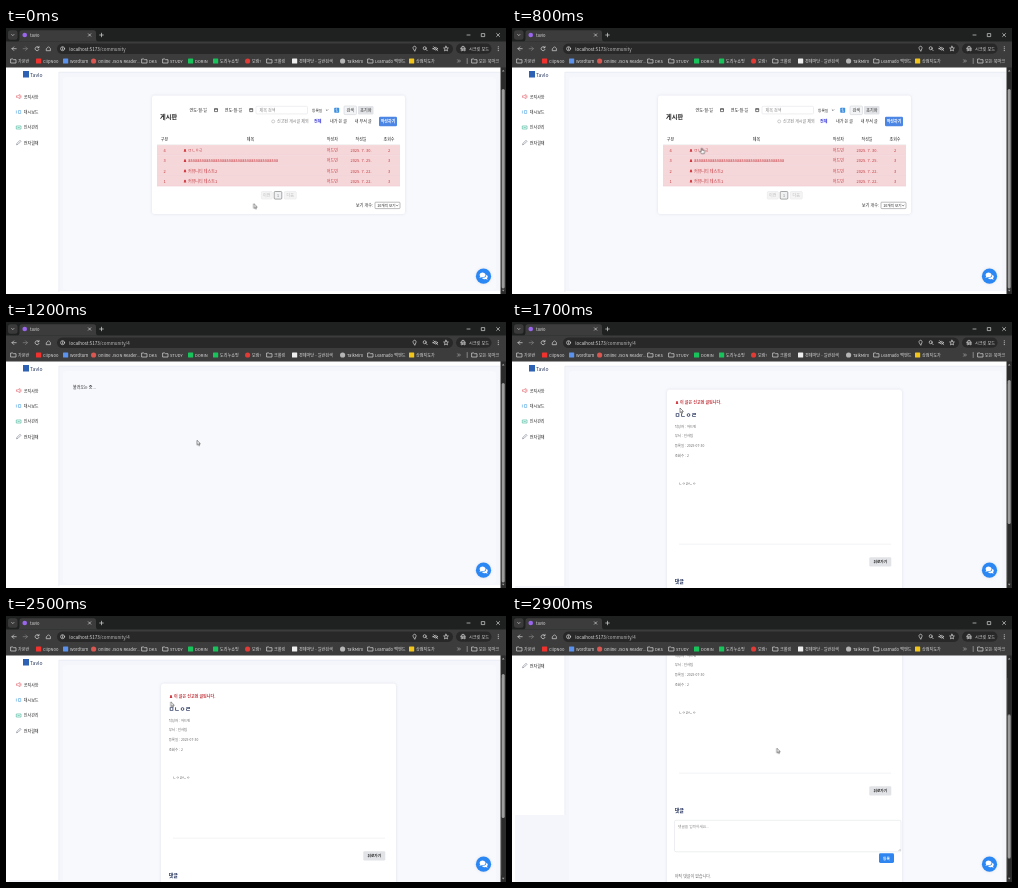
An HTML page for the animation above (3 s loop, 500 by 266 pixels).

```html
<!DOCTYPE html>
<html lang="ko">
<head>
<meta charset="utf-8">
<title>Community board</title>
<style>
html, body { margin: 0; width: 100%; height: 100%; overflow: hidden; background: #fff; }
svg { display: block; width: 500px; height: 266px; }
text { font: 4px "Noto Sans CJK KR", "Noto Sans CJK", "Noto Sans", sans-serif; dominant-baseline: central; fill: #222; white-space: pre; }
.b { font-weight: 700; }
.mid { text-anchor: middle; }
.browser text { fill: #dedede; font-size: 4.1px; }
.line { fill: none; stroke: #d6d6d6; stroke-width: .7; stroke-linecap: round; stroke-linejoin: round; }
.meta text { font-size: 3.4px; fill: #666; }
.row text { fill: #c63d42; }
.shade { filter: drop-shadow(0 0 1.5px rgba(60, 70, 110, .14)); }

.list, .load, .post, .page, .thumb, .cursor, .arrow, .hand { animation: 3s step-end infinite; }
.list { animation-name: list; }
.load { animation-name: load; }
.post { animation-name: post; }
.page { --shift: -65; animation-name: scroll; }
.thumb { --shift: 40.5; animation-name: scroll; }
.cursor { animation-name: move; }
.arrow { animation-name: arrow; }
.hand { animation-name: hand; }

@keyframes list { 0% { opacity: 1 } 39.99%, 100% { opacity: 0 } }
@keyframes load { 0% { opacity: 0 } 39.99% { opacity: 1 } 43.33%, 100% { opacity: 0 } }
@keyframes post { 0% { opacity: 0 } 43.33%, 100% { opacity: 1 } }
@keyframes arrow { 0% { opacity: 1 } 6.66% { opacity: 0 } 39.99%, 100% { opacity: 1 } }
@keyframes hand { 0% { opacity: 0 } 6.66% { opacity: 1 } 39.99%, 100% { opacity: 0 } }
@keyframes scroll {
  0% { transform: matrix(1, 0, 0, 1, 0, 0) }
  86.66% { transform: matrix(1, 0, 0, 1, 0, 0); animation-timing-function: steps(3) }
  96.66%, 100% { transform: matrix(1, 0, 0, 1, 0, var(--shift)) }
}
@keyframes move {
  0% { transform: matrix(1, 0, 0, 1, 247.7, 175.6); animation-timing-function: steps(5) }
  16.66% { transform: matrix(1, 0, 0, 1, 187, 121.3); animation-timing-function: steps(6) }
  36.66% { transform: matrix(1, 0, 0, 1, 192.3, 118.3) }
  39.99% { transform: matrix(1, 0, 0, 1, 191, 118.3); animation-timing-function: steps(5) }
  56.66% { transform: matrix(1, 0, 0, 1, 168, 86); animation-timing-function: steps(8) }
  83.33% { transform: matrix(1, 0, 0, 1, 164.8, 85.8); animation-timing-function: steps(4) }
  96.66%, 100% { transform: matrix(1, 0, 0, 1, 264.8, 132.2) }
}
</style>
</head>
<body>
<svg viewBox="0 0 500 266">
  <defs>
    <path id="folder" class="line" d="M0 -2H1.8L2.5 -1.3H5V2H0Z"/>
    <path id="down" d="M-1.1 -.5L0 .6L1.1 -.5" fill="none" stroke="#333" stroke-width=".6"/>
    <g id="date">
      <text>연도-월-일</text>
      <path d="M25 -1.4H28V1.6H25ZM25 -.7H28" fill="none" stroke="#222" stroke-width=".6"/>
    </g>
    <path id="siren" d="M-1.2 1.6V.9H-.9V-.4A.9 .9 0 0 1 .9 -.4V.9H1.2V1.6Z" fill="#d0343b"/>
  </defs>

  <rect width="500" height="266" fill="#fff"/>

  <g class="page">
    <rect x="53" y="44" width="441" height="219" fill="#f4f6fb"/>
    <rect x="57" y="49" width="433" height="213" rx="3" fill="#f8f9fd"/>
    <g class="post">
      <rect x="3" y="44" width="491" height="310" fill="#f4f6fb"/>
      <rect x="57" y="49" width="433" height="310" rx="3" fill="#f8f9fd"/>
      <rect x="155" y="67.5" width="235" height="290" rx="3" fill="#fff" class="shade"/>
    </g>
    <path d="M0 30H53V264H0Z" fill="#fff"/>
    <path d="M52.8 44V264M53 44.2H494" stroke="#e3e6ee" stroke-width=".6"/>

    <rect x="17" y="43" width="6" height="6.5" fill="#2c61b4"/>
    <text x="24" y="46" style="font-size:5px;fill:#24365c;font-weight:500">Tavlo</text>
    <g style="font-weight:500">
      <text x="17.8" y="68.6">공지사항</text>
      <text x="17.8" y="84">대시보드</text>
      <text x="17.8" y="99.2">인사관리</text>
      <text x="17.8" y="114.6">전자결재</text>
    </g>
    <g fill="none" stroke-width=".7">
      <path d="M10.5 67.8V69.4H11.6L14 70.6V66.6L11.6 67.8ZM15 67.5V69.7" stroke="#e4717a"/>
      <path d="M10.4 82.5V85.5M12.5 82.5V85.5H14.7V82.5Z" stroke="#6db4e8"/>
      <path d="M10.3 98H15V101H10.3ZM11.5 99.5H13.8" stroke="#57bfa5"/>
      <path d="M10.5 116.8L11 115.3L14 112.3L15 113.3L12 116.3Z" stroke="#8a8f9c"/>
    </g>

    <g class="list">
      <rect x="146" y="67.5" width="253" height="118.5" rx="2.5" fill="#fff" class="shade"/>
      <text x="154" y="88.4" class="b" style="font-size:6.2px">게시판</text>
      <use href="#date" x="183.5" y="82"/>
      <use href="#date" x="218.7" y="82"/>
      <rect x="250" y="78.3" width="51.5" height="7.6" rx="1" fill="#fff" stroke="#dcdfe5" stroke-width=".5"/>
      <text x="253.5" y="82" style="fill:#888">제목 검색</text>
      <text x="306" y="82" style="font-size:3.7px">등록일</text>
      <use href="#down" x="321" y="82"/>
      <rect x="328.2" y="79.8" width="5" height="5" rx=".7" fill="#3e8fe0"/>
      <path d="M329.6 81.4L330.7 80.6V83.8M331.8 83L330.7 84" fill="none" stroke="#fff" stroke-width=".5"/>
      <rect x="338" y="78" width="12.5" height="8.6" rx="1" fill="#f3f4f6" stroke="#c9ccd2" stroke-width=".5"/>
      <text x="344.2" y="82.2" class="mid">검색</text>
      <rect x="352" y="78" width="15.5" height="8.6" rx="1" fill="#e1e3e6"/>
      <text x="359.8" y="82.2" class="mid">초기화</text>
      <circle cx="267.2" cy="93.4" r="1.5" fill="#fff" stroke="#888" stroke-width=".4"/>
      <text x="271" y="93.4" style="fill:#777">신고된 게시글 제외</text>
      <text x="308" y="93.4" class="b" style="fill:#3434d8">전체</text>
      <text x="324" y="93.4">내가 쓴 글</text>
      <text x="348.7" y="93.4">내 부서 글</text>
      <rect x="373" y="88.8" width="18" height="9.4" rx="1.2" fill="#4c86e4"/>
      <text x="382" y="93.4" class="b mid" style="fill:#fff">작성하기</text>
      <g class="b mid">
        <text x="158.5" y="111">구분</text>
        <text x="244.5" y="111">제목</text>
        <text x="326.3" y="111">작성자</text>
        <text x="355" y="111">작성일</text>
        <text x="383" y="111">조회수</text>
      </g>
      <path d="M151 116.8H394" stroke="#ddd" stroke-width=".5"/>
      <g id="rows"></g>
      <g stroke-width=".5">
        <rect x="255.3" y="163.5" width="11" height="7.6" rx="1" fill="#f4f4f5" stroke="#e4e4e6"/>
        <rect x="268.2" y="163.5" width="7.6" height="7.6" rx="1" fill="#f0f1f3" stroke="#555"/>
        <rect x="278.3" y="163.5" width="12" height="7.6" rx="1" fill="#f4f4f5" stroke="#e4e4e6"/>
        <rect x="369" y="174.2" width="25" height="6.4" rx=".8" fill="#fff" stroke="#777"/>
      </g>
      <g class="mid">
        <text x="260.8" y="167.2" style="fill:#bbb">이전</text>
        <text x="272" y="167.2" style="font-size:3.6px;fill:#777">1</text>
        <text x="284.3" y="167.2" style="fill:#bbb">다음</text>
      </g>
      <text x="350" y="177.4">보기 개수:</text>
      <text x="371.3" y="177.3" style="font-size:3.6px">10개씩 보기</text>
      <use href="#down" x="391.2" y="177.4"/>
    </g>

    <text x="67" y="65" class="load">불러오는 중...</text>

    <g class="post">
      <use href="#siren" x="165" y="80.4"/>
      <text x="168" y="80.4" class="b" style="fill:#bd2b33">이 글은 신고된 글입니다.</text>
      <text x="162.7" y="92" class="b" style="font-size:6px;fill:#22305a">ㅁㄴㅇㄹ</text>
      <g class="meta">
        <text x="162.7" y="104">작성자 : 어드민</text>
        <text x="162.7" y="113.6">부서 : 인사팀</text>
        <text x="162.7" y="123.5">등록일 : 2025-07-30</text>
        <text x="162.7" y="133.2">조회수 : 2</text>
      </g>
      <text x="166.5" y="161.2" style="font-size:3.8px;fill:#444">ㄴㅇㄹㄴㅇ</text>
      <path d="M167 222.2H379" stroke="#e4e6ea" stroke-width=".5"/>
      <rect x="357.3" y="235.2" width="22" height="9.4" rx="1.3" fill="#e2e3e6"/>
      <text x="368.3" y="239.8" class="b mid" style="font-size:3.7px">뒤로가기</text>
      <text x="162.7" y="258.5" class="b" style="font-size:5px;fill:#22305a">댓글</text>
      <rect x="162.5" y="269.3" width="226.5" height="31.5" rx="1.5" fill="#fff" stroke="#d9dce3" stroke-width=".5"/>
      <path d="M386.5 300L388.5 298M387.8 300L388.5 299.3" stroke="#777" stroke-width=".4"/>
      <text x="166" y="275.5" style="font-size:3.7px;fill:#888">댓글을 입력하세요...</text>
      <rect x="367" y="302.3" width="15" height="9.6" rx="1.4" fill="#2f86f0"/>
      <text x="374.5" y="307" class="b mid" style="font-size:3.7px;fill:#fff">등록</text>
      <text x="162.7" y="325" style="fill:#666">아직 댓글이 없습니다.</text>
    </g>
  </g>

  <circle cx="477.5" cy="248.2" r="7.6" fill="#2b87f3" class="shade"/>
  <g fill="#fff">
    <path d="M473.3 249.8L474.2 248.4A3 2.4 0 1 1 476 249.3Z"/>
    <path d="M480.4 246.8A2.5 2.1 0 0 1 481 250.2L481.7 251.7L479.7 251A3 2.2 0 0 1 476 250Q480.2 250 480.4 246.8Z"/>
  </g>

  <rect x="494.5" y="39" width="5.5" height="227" fill="#2b2b2b"/>
  <path d="M495.9 43.6L497.2 41.8L498.5 43.6ZM495.9 261.8L497.2 263.6L498.5 261.8Z" fill="#a0a0a0"/>
  <rect x="495.7" y="61" width="3" height="199.5" rx="1.5" fill="#9d9d9d"/>
  <g class="post">
    <rect x="495.5" y="46" width="3.5" height="215" fill="#2b2b2b"/>
    <rect x="495.7" y="58" width="3" height="144" rx="1.5" fill="#9d9d9d" class="thumb"/>
  </g>

  <g class="browser">
    <rect width="500" height="39.5" fill="#3c3c3c"/>
    <rect width="500" height="13.5" fill="#1f2020"/>
    <rect x="2" y="2.3" width="9.5" height="9.4" rx="2.5" fill="#3a3a3a"/>
    <path d="M11.5 13.6Q13.5 13.3 13.5 11V5Q13.5 2.2 16 2.2H87.5Q90 2.2 90 5V11Q90 13.3 92 13.6Z" fill="#3c3c3c"/>
    <circle cx="18.7" cy="7" r="2.3" fill="#9a66ee"/>
    <text x="24" y="7">tavlo</text>
    <rect x="51" y="15.4" width="396" height="10.6" rx="5.3" fill="#282828"/>
    <rect x="450" y="15.6" width="35.5" height="10.2" rx="5.1" fill="#282828"/>
    <g class="line">
      <path d="M5.7 6.5L6.8 7.6L7.9 6.5M82.4 5.8L84.8 8.2M84.8 5.8L82.4 8.2M93.7 7H97.3M95.5 5.2V8.8"/>
      <path d="M461 7H464M475.7 5.6H478.7V8.6H475.7ZM490.6 5.5L493.6 8.5M493.6 5.5L490.6 8.5"/>
      <path d="M10.2 20.7H6M7.8 18.9L6 20.7L7.8 22.5"/>
      <path d="M17.2 20.7H21.4M19.6 18.9L21.4 20.7L19.6 22.5" stroke="#858585"/>
      <path d="M32.8 19.6A2 2 0 1 0 33 21.4M33 18.3V19.8H31.5"/>
      <path d="M40.6 20.6L42.5 18.7L44.4 20.6V22.7H40.6Z"/>
      <circle cx="56.6" cy="20.7" r="2"/><path d="M56.6 20.5V21.7M56.6 19.6V19.7"/>
      <path d="M408.6 23L407.2 20.6A1.6 1.6 0 1 1 410 20.6Z"/>
      <circle cx="418.7" cy="20.2" r="1.5"/><path d="M419.8 21.3L421.2 22.7"/>
      <path d="M427 20.7Q429.5 17.9 432 20.7Q429.5 23.5 427 20.7ZM427.6 18.7L431.6 22.8"/>
      <path d="M440 18.2L440.7 19.9L442.4 20L441.1 21.2L441.5 22.9L440 22L438.5 22.9L438.9 21.2L437.6 20L439.3 19.9Z"/>
      <path d="M454.5 20.3H459.5M455.6 20L456 18.4H458L458.4 20"/>
      <circle cx="455.7" cy="22" r=".8"/><circle cx="458.3" cy="22" r=".8"/>
      <path d="M492.3 18.8V18.9M492.3 20.7V20.8M492.3 22.6V22.7" stroke-width="1"/>
      <path d="M451.6 31.8L452.7 33L451.6 34.2M453.3 31.8L454.4 33L453.3 34.2M461.2 30.5V35.5" stroke-width=".5"/>
    </g>
    <g style="--url:4.5px">
      <text x="63.3" y="20.8" class="list" style="font-size:var(--url)">localhost:5173<tspan fill="#b9b9b9">/community</tspan></text>
      <g class="load"><text x="63.3" y="20.8" style="font-size:var(--url)">localhost:5173<tspan fill="#b9b9b9">/community/4</tspan></text></g>
      <g class="post"><text x="63.3" y="20.8" style="font-size:var(--url)">localhost:5173<tspan fill="#b9b9b9">/community/4</tspan></text></g>
    </g>
    <text x="463" y="20.8">시크릿 모드</text>
    <g id="marks"></g>
  </g>

  <g class="cursor" stroke-linejoin="round">
    <path class="arrow" d="M0 0V4.7L1.1 3.7L1.9 5.4L2.7 5L1.9 3.4H3.4Z" fill="#fff" stroke="#111" stroke-width=".45"/>
    <path class="hand" d="M-.5 .6Q0 -.1 .5 .6V2.3L2.6 2.8Q3.2 3 3 3.8L2.5 5.8H-.3L-1.9 3.8Q-1.6 3 -.5 3.8Z" fill="#fff" stroke="#111" stroke-width=".45"/>
  </g>
</svg>
<script>
const rows = [
  [4, "ㅁㄴㅇㄹ", 30, 2],
  [3, "a".repeat(40), 25, 3],
  [2, "커뮤니티 테스트2", 22, 3],
  [1, "커뮤니티 테스트1", 22, 3],
];
document.getElementById("rows").innerHTML = rows.map(([no, title, day, views], i) => {
  const y = 122.2 + i * 10.25;
  const cell = (x, s) => `<text class="mid" x="${x}" y="${y}">${s}</text>`;
  return `<g class="row">
    <rect x="151" y="${y - 5.1}" width="243" height="10.25" fill="#f5d6d9"/>
    <path d="M151 ${y + 5.1}H394" stroke="#e6c6ca" stroke-width=".4"/>
    <use href="#siren" x="179" y="${y}"/>
    <text x="182" y="${y}">${title}</text>
    ${cell(158.5, no)}${cell(326.3, "어드민")}${cell(355, `2025. 7. ${day}.`)}${cell(383, views)}</g>`;
}).join("");

// x, label, then icon colour and shape; folders have neither
const marks = [
  [5, "가온반"], [30, "ClipNoo", "#f0322f", 1], [57, "Wordturn", "#5a92ee", 1],
  [85, "Online JSON Reader...", "#d95750"], [136, "DKS"], [157, "STUDY"],
  [182, "DORIN", "#19c35b", 1], [207, "도리누쇼핑", "#19c35b", 1], [239, "모람!", "#e23b36"],
  [261, "크롤링"], [286, "경제마당 - 일반검색", "#eeeeee", 1], [334, "TalkMiro", "#b5b5b5"],
  [362, "Learnado 백엔드"], [403, "상점지도가", "#f2c51c", 1], [466, "모든 북마크"],
];
document.getElementById("marks").innerHTML = marks.map(([x, label, color, square]) => {
  const icon = !color ? `<use href="#folder" x="${x}" y="33"/>`
    : `<rect x="${x}" y="30.4" width="5.2" height="5.2" rx="${square ? .6 : 2.6}" fill="${color}"/>`;
  return `${icon}<text x="${x + 7}" y="33">${label}</text>`;
}).join("");
</script>
</body>
</html>
```
